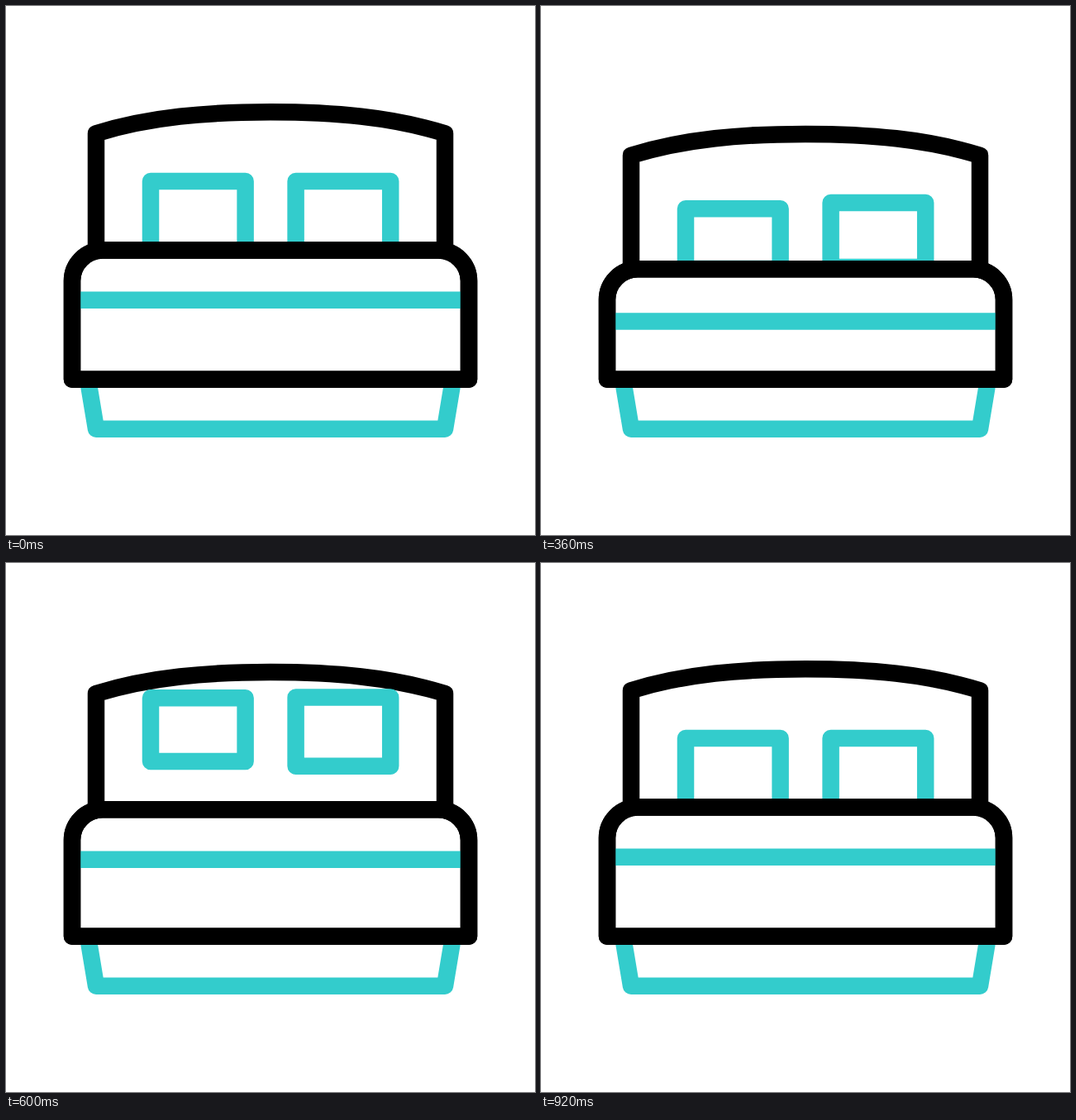
These frames come from a looping animation (640x640 px, 1.48 s). An HTML page:

```html
<!DOCTYPE html>
<html lang="en">
<head>
<meta charset="utf-8">
<title>Bed</title>
<style>
  html, body { margin: 0; height: 100%; overflow: hidden; background: #fff; }
  svg { display: block; width: 100%; height: 100%; }
  path { fill: none; stroke: #000; stroke-width: 20.5; stroke-linejoin: round; }
  .teal { stroke: #33cccc; }
  #cover { fill: #fff; }
</style>
</head>
<body>
<svg viewBox="0 0 640 640">
  <path class="teal" d="M99 451.7L109 511.7H531L541 451.7"/>
  <path id="head" d="M109 296V154.2C174 134 244 128.3 320 128.3S466 134 531 154.2V296"/>
  <path id="left" class="teal"/>
  <path id="right" class="teal"/>
  <path id="cover"/>
  <path id="stripe" class="teal" d="M80 355.7H560"/>
  <path id="edge"/>
</svg>
<script>
const LOOP = 1480, STEP = 40;
const PRESS = 120, LOW = 440, HIGH = 640, REST = 920;
const $ = id => document.getElementById(id);

// Smooth rise from 0 to 1 between two times; skew delays its start.
function ramp(t, from, to, skew = 1) {
  const u = Math.min(1, Math.max(0, (t - from) / (to - from))) ** skew;
  return u * u * (3 - 2 * u);
}

// The mattress sinks and springs back.
const dip = (t, depth, skew) =>
  depth * (ramp(t, PRESS, LOW, skew) - ramp(t, LOW, HIGH));

// A pillow value goes from 0 to a (sunk), b (tossed), c (landed) and back to 0.
const toss = (t, a, b, c, land) =>
  a * ramp(t, PRESS, LOW) + (b - a) * ramp(t, LOW, HIGH) +
  (c - b) * ramp(t, HIGH, land) - c * ramp(t, land, REST);

function pillow(id, x, t, sink, drop, squash, land) {
  const top = 212.1 + toss(t, sink, -59, drop, land);
  const height = 84 - toss(t, squash, squash - 7, 12.5, land);
  $(id).setAttribute("d", `M${x} ${top}h114.6v${height}h-114.6Z`);
}

const shift = (id, y) => $(id).setAttribute("transform", `translate(0 ${y})`);

function draw(t) {
  shift("head", dip(t, 36.4, 1.45));
  shift("stripe", dip(t, 30.5));
  pillow("left", 175, t, 39.4, 8.6, 13.5, 820);
  pillow("right", 350.6, t, 30.7, 18.7, 7, 780);
  const y = 295.6 + dip(t, 26.3, 0.91);
  const d = `M80 451.7V${y + 37}a37 37 0 0 1 37 -37H523a37 37 0 0 1 37 37V451.7Z`;
  $("cover").setAttribute("d", d);
  $("edge").setAttribute("d", d);
}

const start = performance.now();
function tick() {
  const t = (performance.now() - start) % LOOP;
  draw(Math.floor(t / STEP) * STEP);
  requestAnimationFrame(tick);
}
tick();
</script>
</body>
</html>
```
